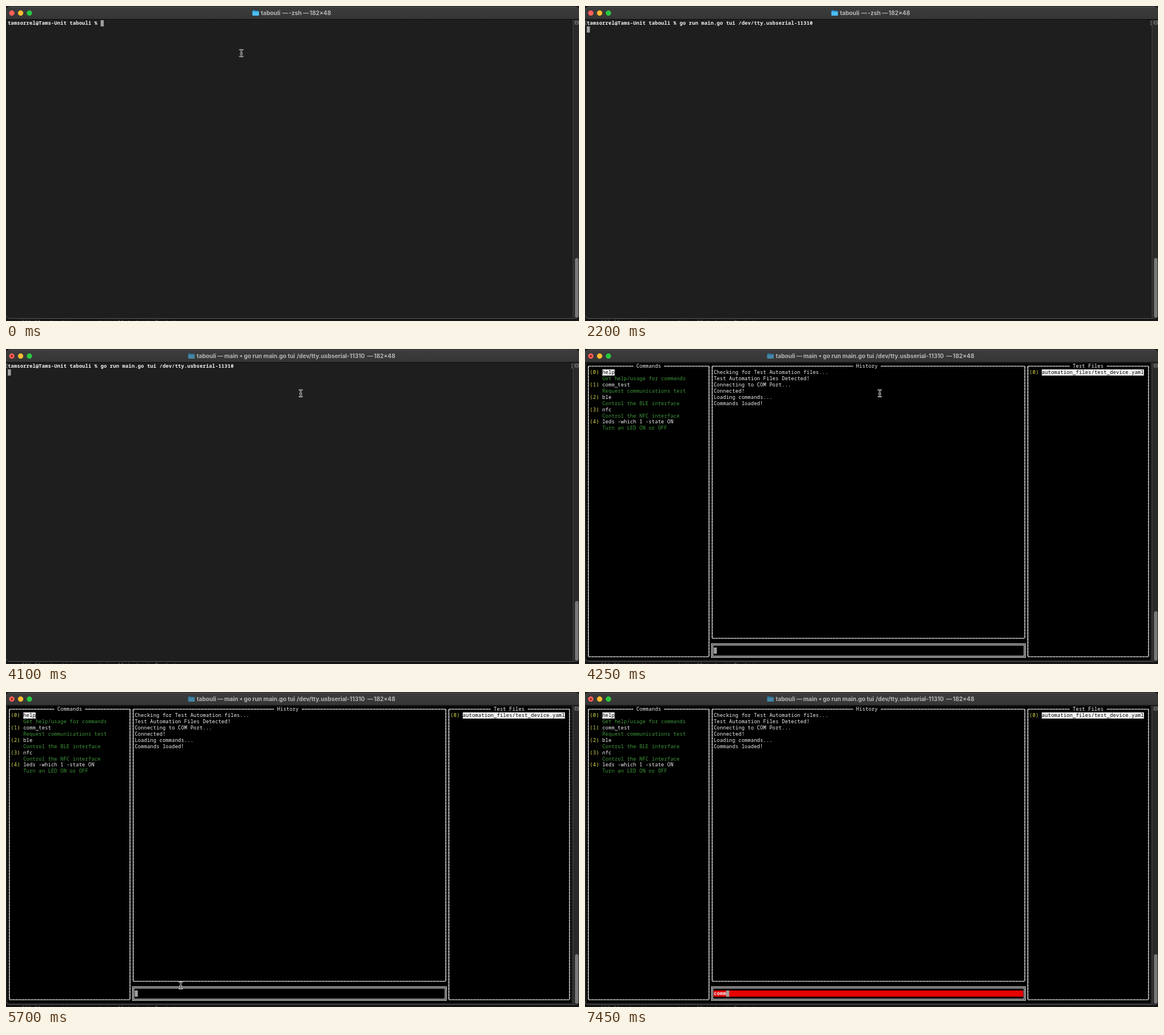
An HTML page for the animation above (8 s loop, 1008 px wide and 555 px high).

```html
<!DOCTYPE html>
<html lang="en">
<head>
<meta charset="utf-8">
<title>Terminal session</title>
<style>
html, body { margin: 0; width: 100%; height: 100%; overflow: hidden; background: #141414; }
svg { display: block; width: 100vw; height: 100vh; }
text { white-space: pre; }
.mono text { font: 500 8.75px "Noto Sans Mono", "DejaVu Sans Mono", monospace; letter-spacing: .195px; fill: #f4f4f4; }
.mono .bold { font-weight: 700; }
.mono .yellow { fill: #dcdc50; }
.mono .green { fill: #3f9b3a; }
.mono .black { fill: #000; }
.mono .dim { fill: #9a9a9a; }
#title text { font: 700 10.2px Inter, "Liberation Sans", sans-serif; fill: #b5b5b5; }
</style>
</head>
<body>
<svg viewBox="0 0 1008 555" preserveAspectRatio="none">
  <defs>
    <linearGradient id="bar" x2="0" y2="1">
      <stop offset="0" stop-color="#3c3c3c"/>
      <stop offset="1" stop-color="#353535"/>
    </linearGradient>
    <path id="ibeam" d="M-2.4 -5.9Q0 -5.9 0 -4.3Q0 -5.9 2.4 -5.9M0 -4.3V4.3M-2.4 5.9Q0 5.9 0 4.3Q0 5.9 2.4 5.9M-1.3 .8H1.3"/>
  </defs>
  <rect width="1008" height="555" fill="#161616"/>
  <g class="mono"><text class="dim" x="28" y="559.5" opacity=".6">516:24 automations can not in all tasks in Ready to go now</text></g>
  <rect x="-.5" y="1.5" width="1009" height="549" rx="7" fill="#1e1e1e" stroke="#585858"/>
  <path d="M0 23.5V9Q0 2 7 2H1001Q1008 2 1008 9V23.5Z" fill="url(#bar)"/>
  <path d="M0 23.5H1008" stroke="#0c0c0c"/>
  <circle cx="10.2" cy="12.5" r="4.7" fill="#ff5f57"/>
  <circle cx="25.7" cy="12.5" r="4.7" fill="#febc2e"/>
  <circle cx="41.2" cy="12.5" r="4.7" fill="#28c840"/>
  <circle id="busy" cx="10.2" cy="12.5" r="1.6" fill="#74100b"/>
  <g id="title"></g>

  <rect x="997.5" y="24" width="10.5" height="525" fill="#2a2a2a"/>
  <path d="M997.5 24V549" stroke="#434343"/>
  <path d="M1001 26.5h6v5.5h-6zM1001 29.2h6" fill="none" stroke="#929292" stroke-width=".9"/>
  <rect id="thumb" x="1001" width="6" rx="3" fill="#777"/>

  <g id="shell" class="mono"></g>
  <g id="tui" class="mono"></g>

  <g id="beam" fill="none" stroke-linecap="round">
    <use href="#ibeam" stroke="#e6e6e6" stroke-width="2.4"/>
    <use href="#ibeam" stroke="#111" stroke-width=".9"/>
  </g>
</svg>
<script>
const LOOP = 8000, STEP = 50;
const CELL = 5.445, ROW = 10.89, LEFT = 3.15, TOP = 25;
const PROMPT = 'tamsorrel@Tams-Unit tabouli % ';
const COMMAND = 'go run main.go tui /dev/tty.usbserial-11310';

const $ = id => document.getElementById(id);
const colX = c => LEFT + c * CELL;
const rowY = r => TOP + r * ROW;
const show = (node, on) => node.setAttribute('visibility', on ? 'visible' : 'hidden');

function add(parent, tag, attrs, content) {
  const node = document.createElementNS('http://www.w3.org/2000/svg', tag);
  for (const key in attrs) node.setAttribute(key, attrs[key]);
  if (content !== undefined) node.textContent = content;
  parent.appendChild(node);
  return node;
}
const print = (parent, col, row, str, cls = '') =>
  add(parent, 'text', { x: colX(col), y: rowY(row) + 8.4, class: cls }, str);
const block = (parent, col, row, cells, fill) =>
  add(parent, 'rect', { x: colX(col), y: rowY(row), width: cells * CELL, height: ROW, fill });

// Window title
const title = $('title');
const folder = add(title, 'g', {});
add(folder, 'path', { d: 'M0 9Q0 7.6 1.2 7.6H4L5.2 8.6H10.4Q11.4 8.6 11.4 9.6V15.8Q11.4 17 10.2 17H1.2Q0 17 0 15.8Z', fill: '#2595d8' });
add(folder, 'path', { d: 'M0 10.2H11.4V15.8Q11.4 17 10.2 17H1.2Q0 17 0 15.8Z', fill: '#4fbdf3' });
const word = str => add(title, 'text', { y: 15.8 }, str);
const parts = ['tabouli', '—', '', 'go run main.go tui', '/dev/tty.usbserial-11310', '—', '182×48'].map(word);
const arrow = add(title, 'path', { d: 'M4 10.2V14.8L0 12.5Z', fill: '#b5b5b5' });

function setTitle(job, labelWidth) {
  const idle = job === '-zsh';
  // Everything stays centred, so a wider label pushes both halves outward.
  const d = idle ? 113 : (24 - labelWidth) / 2;
  const xs = idle
    ? [448.5, 486, 497.5, 0, 0, 522.5, 534]
    : [335.5 + d, 372 + d, 384 + d, 418.5 - d, 511.5 - d, 635.5 - d, 647 - d];
  parts.forEach((part, i) => part.setAttribute('x', xs[i]));
  parts[2].textContent = job;
  show(parts[3], !idle);
  show(parts[4], !idle);
  show(arrow, !idle && job);
  arrow.setAttribute('transform', `translate(${411 - d} 0)`);
  folder.setAttribute('transform', `translate(${xs[0] - 15} 0)`);
  folder.setAttribute('opacity', idle ? 1 : .58);
}

// Shell
const shell = $('shell');
const caret = block(shell, 0, 0, 1, '#a0a0a0');
print(shell, 0, 0, PROMPT, 'bold');
const typed = print(shell, PROMPT.length, 0, '', 'bold');
const marks = add(shell, 'g', {});
print(marks, -.75, 0, '[', 'dim');
print(marks, 181.8, 0, ']', 'dim');

// Text interface
const tui = $('tui');
add(tui, 'rect', { x: LEFT, y: TOP, width: 182 * CELL, height: 48 * ROW, fill: '#000' });

// A rule built from box-drawing cells: faint seams where the cells meet.
function rule(d, period, width) {
  add(tui, 'path', { d, fill: 'none', stroke: '#8c8c8c', 'stroke-width': width });
  add(tui, 'path', {
    d, fill: 'none', stroke: '#dedede', 'stroke-width': width,
    'stroke-dasharray': `${period - 1.2} 1.2`
  });
}

function frame(c0, c1, r1, label, at) {
  const x0 = colX(c0 + .5), x1 = colX(c1 + .5), y0 = rowY(.5), y1 = rowY(r1 + .5);
  const gap = colX(at - 1), end = colX(at + label.length + 1);
  rule(`M${x0} ${y0}H${gap}M${end} ${y0}H${x1}M${x0} ${y1}H${x1}`, CELL, 1.2);
  rule(`M${x0} ${y0}V${y1}M${x1} ${y0}V${y1}`, ROW / 2, 1.4);
  print(tui, at, 0, label);
}
frame(0, 39, 47, 'Commands', 16);
frame(40, 141, 44, 'History', 87);
frame(142, 181, 47, 'Test Files', 157);

for (const k of [-1.1, 1.1]) {
  add(tui, 'rect', {
    x: colX(40.5) + k, y: rowY(45.5) + k,
    width: 101 * CELL - 2 * k, height: 2 * ROW - 2 * k,
    fill: 'none', stroke: '#d4d4d4', 'stroke-width': 1.3
  });
}

block(tui, 5, 1, 4, '#f4f4f4');
[
  ['help', 'Get help/usage for commands'],
  ['comm_test', 'Request communications test'],
  ['ble', 'Control the BLE interface'],
  ['nfc', 'Control the NFC interface'],
  ['leds -which 1 -state ON', 'Turn an LED ON or OFF']
].forEach(([name, note], i) => {
  print(tui, 1, 1 + 2 * i, `(${i})`, 'yellow');
  print(tui, 5, 1 + 2 * i, name, i ? '' : 'black');
  print(tui, 5, 2 + 2 * i, note, 'green');
});
[
  'Checking for Test Automation files...',
  'Test Automation Files Detected!',
  'Connecting to COM Port...',
  'Connected!',
  'Loading commands...',
  'Commands loaded!'
].forEach((line, i) => print(tui, 41, 1 + i, line));
const file = 'automation_files/test_device.yaml';
print(tui, 143, 1, '(0)', 'yellow');
block(tui, 147, 1, file.length, '#f4f4f4');
print(tui, 147, 1, file, 'black');

const alert = block(tui, 41, 46, 100, '#e60000');
const inputCaret = block(tui, 41, 46, 1, '#a0a0a0');
const input = print(tui, 41, 46, '', 'bold');

// Pointer
const path = [
  [3700, 419.5, 80.5], [3950, 534, 81], [4100, 518.5, 78],
  [4950, 518.5, 78], [5700, 307.5, 517], [5800, 306.5, 519], [5900, 306, 520]
];
function pointer(t) {
  if (t < 50) return [414, 83];
  if (t < 3300 || t >= 7000) return null;
  const i = path.findIndex(p => p[0] >= t);
  if (i === 0) return path[0].slice(1);
  if (i < 0) return path[path.length - 1].slice(1);
  const [t0, x0, y0] = path[i - 1], [t1, x1, y1] = path[i];
  const k = (t - t0) / (t1 - t0), e = k * k * (3 - 2 * k);
  return [x0 + (x1 - x0) * e, y0 + (y1 - y0) * e];
}

function render(t) {
  const running = t >= 2550, open = t >= 4250, entered = t >= 2000;

  if (!running) setTitle('-zsh');
  else if (t < 2700) setTitle('', -10.5);
  else if (t < 2900) setTitle('compile', 41);
  else if (t < 3100) setTitle('link', 18.5);
  else setTitle('main', 24);
  show($('busy'), running);

  const line = t >= 1550 ? COMMAND : t >= 50 && t < 700 ? 'clear' : '';
  typed.textContent = line;
  show(caret, !open);
  caret.setAttribute('x', colX(entered ? 0 : PROMPT.length + line.length));
  caret.setAttribute('y', rowY(entered ? 1 : 0));
  show(marks, entered && !open);
  show(shell, !open);
  show(tui, open);

  const keys = [7000, 7100, 7250, 7450].filter(k => t >= k).length;
  input.textContent = 'comm'.slice(0, keys);
  alert.setAttribute('opacity', keys ? 1 : 0);
  inputCaret.setAttribute('x', colX(41 + keys));

  const thumbTop = open ? 462 : 444;
  $('thumb').setAttribute('y', thumbTop);
  $('thumb').setAttribute('height', 549 - thumbTop);

  const at = pointer(t);
  show($('beam'), at);
  if (at) $('beam').setAttribute('transform', `translate(${at})`);
}

const start = performance.now();
function tick() {
  const t = (performance.now() - start) % LOOP;
  render(Math.floor(t / STEP) * STEP);
  requestAnimationFrame(tick);
}
tick();
</script>
</body>
</html>
```
